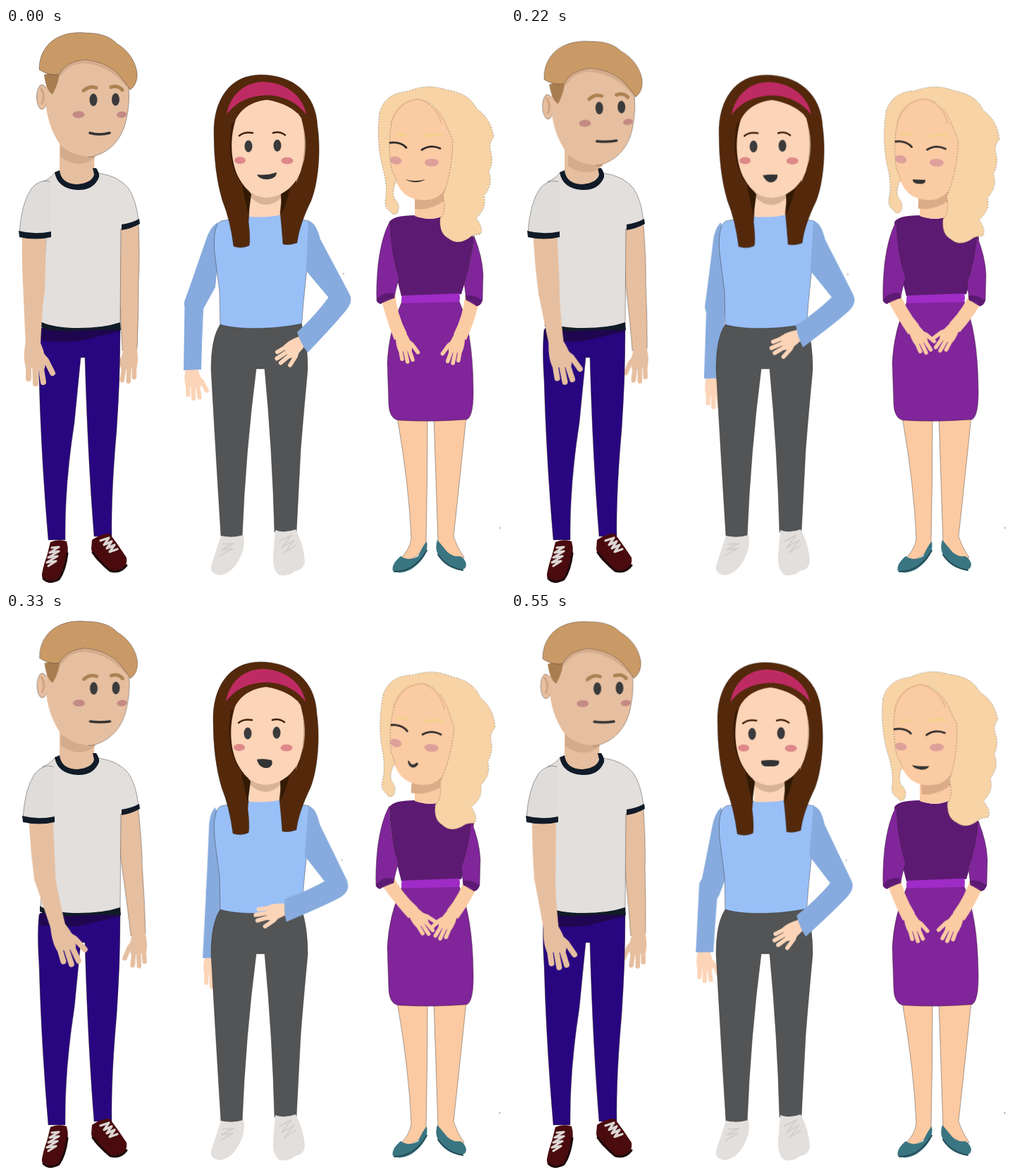
Write an HTML page without scripts that moves like this. It is 708 px wide and 791 px high and loops after 0.66 s.

```html
<!DOCTYPE html>
<html lang="en">
<head>
<meta charset="utf-8">
<title>Three people chatting</title>
<style>
html, body { margin: 0; width: 100%; height: 100%; overflow: hidden; background: #fff; }
svg { display: block; width: 100%; height: 100%; }

/* Each part supplies its poses as --b, --c, --d; the rest pose is its own style. */
@keyframes pose {
  0%, 100% { transform: none; }
  16.667%, 83.333% { transform: var(--b); }
  33.333%, 66.667% { transform: var(--c); }
  50% { transform: var(--d); }
}
@keyframes talk {
  0%, 100% { d: var(--a); }
  16.667%, 83.333% { d: var(--b); }
  33.333%, 66.667% { d: var(--c); }
  50% { d: var(--d); }
}
.m { animation: pose .66s step-end infinite; }
.talk { animation: talk .66s step-end infinite; }
.line { fill: none; stroke-linecap: round; stroke-linejoin: round; }
.edge { stroke: #2a211c; stroke-opacity: .45; stroke-width: .9; }

#man-head { transform-origin: 115px 100px; --b: translate(-1.5px, 5.5px) rotate(-.7deg); --c: translate(1.2px, 12px) rotate(-1.8deg); --d: translate(.5px, 5px); }
#man-sleeve { --b: translateX(3px); --c: translateX(5px); --d: translateX(5px); }
#man-arm { transform-origin: 40px 300px; --b: translateX(7px) rotate(-1deg); --c: translateX(9px) rotate(-4deg); --d: translateX(10px) rotate(-4deg); }
#man-fore { transform-origin: 38px 375px; --b: rotate(-7deg); --c: rotate(-5deg); --d: rotate(-12deg); }
#man-far { transform-origin: 176px 285px; --b: rotate(-1.6deg); --c: rotate(-2.4deg); --d: rotate(-4deg); }
#man-mouth { --a: path("M119 149Q132 153 147 149"); --b: path("M119 149Q133 151 147 149"); --c: path("M119 149Q133 151 147 149"); --d: path("M119 149Q133 151 147 149"); }

#mid-head { --b: translate(-1.9px, 3.7px); --c: translate(.1px, .3px); --d: translate(-1px, 3px); }
#mid-arm { transform-origin: 298px 288px; --b: rotate(-8deg); --c: rotate(-12deg); --d: rotate(-16.6deg); }
#mid-fore { transform-origin: 267px 390px; --b: translateY(-7px) rotate(10deg); --c: translateY(8px) rotate(13deg); --d: rotate(18.6deg); }
#mid-hip { transform-origin: 428px 280px; --b: rotate(2.5deg); --c: rotate(1deg); --d: rotate(2deg); }
#mid-hip-fore { transform-origin: 472px 385px; --b: rotate(1.5deg); --c: rotate(8.5deg); --d: rotate(21.5deg); }
#mid-mouth {
  --a: path("M356 208Q370 210 384 205Q384 214 370 215Q359 215 356 208Z");
  --b: path("M357 206Q370 204 382 206Q384 214 372 214L362 214Q356 212 357 206Z");
  --c: path("M357 209Q367 207 378 208Q379 217 369 219Q362 219 357 209Z");
  --d: path("M357 205Q366 203 378 206Q381 215 372 217Q360 218 357 205Z");
}

#fair-head { transform-origin: 597px 186px; --b: rotate(-2.2deg); --c: rotate(2deg); --d: rotate(4.5deg); }
#fair-left { --b: translateX(2px); --c: translateX(2px); --d: translateX(-1px); }
#fair-right { --b: translateX(-1px); --c: translateX(-3px); --d: translateX(-4px); }
#fair-left-fore { transform-origin: 541px 385px; --b: translateY(-5px) rotate(-5deg); --c: translateY(-4px) rotate(-13deg); --d: translateY(-2px) rotate(-21deg); }
#fair-right-fore { transform-origin: 661px 386px; --b: translateY(-4px) rotate(10deg); --c: translateY(-6px) rotate(17deg); --d: translateY(-6px) rotate(12deg); }
#fair-mouth {
  --a: path("M566 215Q580 219 595 215Q582 223 566 215Z");
  --b: path("M568 215Q580 218 592 217Q591 222 581 222Q570 220 568 215Z");
  --c: path("M571 216Q580 216 589 216Q590 222 581 222Q571 222 571 216Z");
  --d: path("M572 212Q574 211 576 215Q580 219 584 214Q587 212 587 216Q582 224 575 219Q572 215 572 212Z");
}
</style>
</head>
<body>
<svg viewBox="0 0 708 791" preserveAspectRatio="none">
<defs>
  <g id="hand">
    <path fill="currentColor" d="M-10 -3C-13 14 -13 24 -10 34L16 37Q22 24 10 -3Z"/>
    <path class="line" stroke="currentColor" stroke-width="8" d="M-6 27L-6 50M3 30L4 57M11 30L15 55M10 14L19 24L28 42"/>
  </g>
</defs>

<!-- Man -->
<g color="#e6bfa0">
  <g id="man-far" class="m">
    <path fill="#e6bfa0" class="edge" d="M155 280L188 277Q190 330 188 360Q188 410 186 456L165 458Q163 410 160 370Z"/>
    <use href="#hand" transform="translate(177 455) scale(-.82 .82)"/>
  </g>
  <path fill="#28067f" class="edge" d="M47 428Q44 455 47 500Q50 610 60 727L84 727Q83 650 97 560L106 468L112 468Q116 610 125 722L150 722Q149 660 157 570Q162 500 162 428Z"/>
  <path fill="#1f0650" d="M48 426L162 426L162 431Q130 438 108 444Q75 448 47 443Z"/>
  <path fill="#4a0b0e" d="M63 730Q75 725 86 729Q91 745 83 766Q78 787 62 788Q50 786 51 775Q54 760 58 750ZM122 727Q135 718 147 718Q160 735 171 752Q173 768 158 772Q145 773 136 762Q122 750 121 740Z"/>
  <path class="line" stroke="#1c0a0b" stroke-width="3" d="M53 782Q62 790 75 783Q84 770 87 746M123 745Q140 765 148 771Q162 775 171 763"/>
  <path class="line" stroke="#dcd6d4" stroke-width="3.2" d="M65 738L75 737L62 745L75 743L60 752L73 750L58 759L71 757L60 764M134 728L146 724L139 734L150 729L143 739L154 734L147 744L158 740"/>

  <path fill="#e2dfdd" class="edge" d="M70 205Q62 215 52 218L48 300L57 300L49 418Q70 430 110 428L162 422L163 285L188 274Q185 245 174 228Q160 210 131 206Z"/>
  <path fill="#111b28" d="M164 279Q178 277 189 271L190 278Q178 285 164 287ZM48 416Q60 424 95 426Q135 427 162 418L163 429Q130 428 97 430Q62 432 48 424Z"/>
  <path fill="#e6bfa0" d="M76 160L126 160L125 207Q118 224 101 224Q82 222 76 208Z"/>

  <g id="man-arm" class="m">
    <path fill="#e6bfa0" d="M23 290L57 290Q56 340 55 375Q38 392 25 380Q22 340 23 290Z"/>
    <g id="man-fore" class="m">
      <path fill="#e6bfa0" d="M24.500 374Q38 360 55 372Q51 400 49 450L28 452Q26 410 24.500 374Z"/>
      <use href="#hand" transform="translate(38 448)"/>
    </g>
  </g>
  <g id="man-sleeve" class="m">
    <path fill="#dfdddb" d="M63 218Q48 214 36 228Q22 248 19 290Q40 296 64 292Z"/>
    <path class="line edge" d="M62 218Q48 214 36 228Q22 248 19 290"/>
    <path fill="#111b28" d="M18 288Q40 294 64 289L64 297Q42 302 19 297Z"/>
  </g>
  <path fill="#111b28" d="M69 205L76 202Q78 221 101 222Q122 220 125 208L123 199L128 199Q133 206 132 212Q124 231 101 230Q73 228 69 205Z"/>

  <g id="man-head" class="m">
    <path fill="#d4ab8b" d="M78 162L127 165L126 184Q104 202 77 183Z"/>
    <ellipse class="edge" cx="51" cy="98" rx="7.500" ry="17.500" fill="#e6bfa0"/>
    <path class="line" stroke="#d0a481" stroke-width="3" d="M50 86Q56 97 51 107"/>
    <path fill="#e6bfa0" class="edge" stroke-dasharray="0 130 160 900" d="M56 84C54 120 64 148 78 167Q96 183 122 183C150 176 166 155 171 128Q176 105 174 84C165 55 135 40 105 40Q84 45 72 64Z"/>
    <path fill="#a87d50" d="M54 66L76 62Q76 76 66 94Q57 90 54 66Z"/>
    <path class="line" stroke="#d4ab8b" stroke-width="4" d="M77 66Q88 49 110 48Q145 50 171 80"/>
    <path fill="#ca9a66" class="edge" d="M47 59Q47 40 57 27C70 10 92 5 113 7C136 7 150 14 157 22C174 32 184 48 186 64Q187 80 176 88Q170 78 160 66C145 51 125 46 110 45Q84 48 75 66Q60 68 47 59Z"/>
    <path class="line" stroke="#ad8253" stroke-width="5" d="M110 89Q119 81 128 85M149 84Q159 81 165 88"/>
    <g fill="#3b3b3c"><ellipse cx="124" cy="102" rx="5.500" ry="9"/><ellipse cx="155.500" cy="101.500" rx="5.500" ry="9"/></g>
    <g fill="#c48a84"><ellipse cx="103" cy="123" rx="8.500" ry="5"/><ellipse cx="164" cy="123" rx="7" ry="4.500" transform="rotate(-8 164 123)"/></g>
    <path id="man-mouth" class="line talk" stroke="#333" stroke-width="3.500" d="M119 149Q132 153 147 149"/>
  </g>
</g>

<!-- Woman in blue -->
<g color="#fcd4b8">
  <g id="mid-arm" class="m">
    <path fill="#87abde" d="M300 276Q289 284 284 300L265 355L254 386A14 14 0 0 0 281 397L297 368L304 300Z"/>
    <g id="mid-fore" class="m">
      <use href="#hand" transform="translate(263 484) scale(.78 .74)"/>
      <path fill="#87abde" d="M253.500 391A13.500 13.500 0 0 1 280.500 391Q278 440 277 485L252 486Z"/>
    </g>
  </g>
  <path fill="#99bff7" class="edge" d="M345 267L305 274Q293 280 296 320L303 375L304 428L419 428L422 390L427 340L430 274Q410 271 392 265Z"/>
  <path fill="#535455" class="edge" d="M304 421C325 428 375 429 419 420Q428 445 428 485Q421 560 418 600L412 716L381 716Q378 600 367 484L355 484Q340 600 335 724L305 722Q298 610 291 485Q291 440 304 421Z"/>
  <g fill="#e2dfdd">
    <path d="M305 721Q320 725 337 720Q340 735 333 750Q322 775 303 777Q289 775 291 764Q298 742 305 721ZM382 713Q395 718 411 712Q423 735 424 758Q422 770 410 771Q402 779 388 777Q378 770 379 750Z"/>
    <path class="line" stroke="#d2cfcd" stroke-width="2" d="M308 733L323 732L306 741L322 739L304 749M388 729L405 720L391 738L409 727L395 745L411 735"/>
  </g>
  <g id="mid-hip" class="m">
    <path fill="#87abde" d="M429 274Q440 276 446 300L470 345L487 377Q493 390 476 402L459 390L457 382L426 345Z"/>
    <circle cx="479" cy="349" r=".9" fill="#999"/>
    <g id="mid-hip-fore" class="m">
      <use href="#hand" transform="translate(419 445) rotate(59) scale(.74)"/>
      <path fill="#87abde" d="M458 382Q475 364 488 379Q492 388 484 399Q470 417 428 461Q418 448 413 432Q440 407 458 382Z"/>
    </g>
  </g>
  <path fill="#fcd4b8" d="M345 225L392 225L392 265Q370 270 345 268Z"/>

  <g id="mid-head" class="m">
    <path fill="#d8b396" d="M344 215L394 215L393 238Q370 264 344 238Z"/>
    <path fill="#54290b" class="edge" d="M295 150C294 102 318 66 362 66.500C406 66.500 440 92 442 140C447 175 443 220 433 245Q416 280 413 305Q403 309 393 307Q391 280 389 262Q390 240 402 220L335 220Q348 236 344 275Q347 300 345 309Q334 314 323 310Q318 272 307 245Q295 205 295 150Z"/>
    <path fill="#321a04" d="M334 218L348 236L344 266Q338 240 334 218ZM404 218L390 236L391 264Q402 240 404 218Z"/>
    <path fill="#3b1c05" d="M320 135Q312 180 328 212L345 236L340 130Z"/>
    <path fill="#b9987f" d="M414 120Q430 150 423 188L412 220Z"/>
    <path fill="#fcd4b8" d="M370 102C352 104 335 112 326 130C316 160 320 195 331 214Q346 241 370 241C394 240 411 222 418 204C425 180 425 150 419 128C409 112 385 104 370 102Z"/>
    <path fill="#be2b63" d="M313 123C318 95 338 77 365 76.500C395 77 421 95 426 123C410 101 385 95 368 95.500C345 97 327 104 313 123Z"/>
    <path class="line" stroke="#40220c" stroke-width="2.500" d="M331 153Q338 147 350 149M379 149Q388 146 396 152"/>
    <g fill="#3b3b3c"><ellipse cx="344" cy="168" rx="5.500" ry="8.500"/><ellipse cx="385" cy="167" rx="5.500" ry="8.500"/></g>
    <g fill="#de8889"><ellipse cx="332" cy="188" rx="8" ry="5"/><ellipse cx="399" cy="188.500" rx="8.500" ry="5"/></g>
    <path id="mid-mouth" class="talk" fill="#333" d="M356 208Q370 210 384 205Q384 214 370 215Q359 215 356 208Z"/>
  </g>
</g>

<!-- Woman in purple -->
<g color="#fbcba3">
  <path fill="#fbcaa2" class="edge" d="M555 552L598 552Q598 640 596 730Q588 757 556 757Q573 742 575 725Q572 650 555 552ZM607 552L653 552Q645 630 635 722Q640 738 650 752Q630 760 613 730Q610 640 607 552Z"/>
  <path fill="#3a7582" d="M560 750Q546 762 549 771Q560 777 576 768Q601 750 597 729Q590 737 585 750Q572 758 560 750ZM612 727Q608 738 613 748Q621 764 640 769Q653 772 653 761Q651 753 644 750Q631 752 622 739Z"/>
  <path class="line" stroke="#254d58" stroke-width="2" d="M551 772Q580 772 597 742M613 748Q625 766 648 770"/>
  <path fill="#5d1a72" d="M544 276Q548 266 580 266Q602 276 622 266Q650 270 664 298Q660 335 646 378L561 381Q545 320 544 276Z"/>
  <path fill="#80259a" class="edge" d="M562 388Q543 430 541 475L543 535Q544 554 556 557Q600 560 654 556Q664 551 663 510Q662 430 643 388Z"/>
  <path fill="#9f2cc6" d="M562 380L643 377Q645 383 643 389L562 391Q560 386 562 380Z"/>
  <g id="fair-left-fore" class="m">
    <path fill="#fbcba3" d="M531 380L552 376Q554 405 569 434L551 443Q540 415 531 380Z"/>
    <use href="#hand" transform="translate(560 435) rotate(-10) scale(.7)"/>
  </g>
  <g id="fair-right-fore" class="m">
    <path fill="#fbcba3" d="M652 376L672 384Q666 415 653 443L635 435Q649 408 652 376Z"/>
    <use href="#hand" transform="translate(644 436) rotate(10) scale(-.7 .72)"/>
  </g>
  <g id="fair-left" class="m">
    <path fill="#80259a" class="edge" d="M545 274Q533 295 528 335Q525 365 526 388L532 391L551 383Q553 370 558 355Q546 320 545 274Z"/>
    <path fill="#5d1a72" d="M526 385Q536 374 550 377L551 384Q538 384 532 392Q526 391 526 385Z"/>
  </g>
  <g id="fair-right" class="m">
    <path fill="#80259a" class="edge" d="M664 295Q676 325 677 350L676 387L668 395L653 386L650 362Q661 330 664 295Z"/>
    <path fill="#5d1a72" d="M652 380Q665 378 676 387Q674 394 668 395Q663 387 653 387Z"/>
  </g>
  <path fill="#fbcba3" d="M580 235L630 235L624 266Q602 275 580 267Z"/>

  <g id="fair-head" class="m">
    <path fill="#dcac88" d="M580 230L630 215L624 244Q602 260 580 257Z"/>
    <path fill="#fbcba3" d="M541 125Q560 98 588 101Q616 112 638 150L634 200Q628 235 605 243Q580 248 565 235C550 220 538 190 541 125Z"/>
    <path fill="#f7d3a5" class="edge" stroke-dasharray="2 2" d="M530 120Q538 92 570 90Q598 78 625 88Q657 92 668 115Q688 128 692 155Q684 164 688 176Q692 190 685 204Q692 222 678 238Q683 256 667 270Q678 284 673 293Q662 293 656 299Q640 309 628 299Q614 292 616 270Q625 262 620 238Q633 205 634 160Q628 146 622 132Q606 102 584 101Q556 105 547 135Q541 165 547 200L554 216Q547 232 551 242Q561 252 555 263Q549 267 546 261Q535 255 539 240Q541 220 534 197Q525 160 530 120Z"/>
    <path class="line" stroke="#e8b78c" stroke-width="1.800" d="M546 136Q554 105 584 101Q609 106 618 135"/>
    <path class="line" stroke="#f2d08f" stroke-width="4" d="M554 154Q560 150 566 152M593 154Q605 149 618 153"/>
    <path class="line" stroke="#2f2b2b" stroke-width="2.800" d="M545 163Q560 161 568 170M590 173Q602 165 616 171"/>
    <g fill="#dda09a"><ellipse cx="553" cy="188" rx="8.500" ry="5.500" transform="rotate(12 553 188)"/><ellipse cx="604" cy="191" rx="10" ry="5.500"/></g>
    <path id="fair-mouth" class="talk" fill="#333" d="M566 215Q580 219 595 215Q582 223 566 215Z"/>
  </g>
</g>
<circle cx="700.500" cy="710" r=".8" fill="#555"/>
</svg>
</body>
</html>
```
